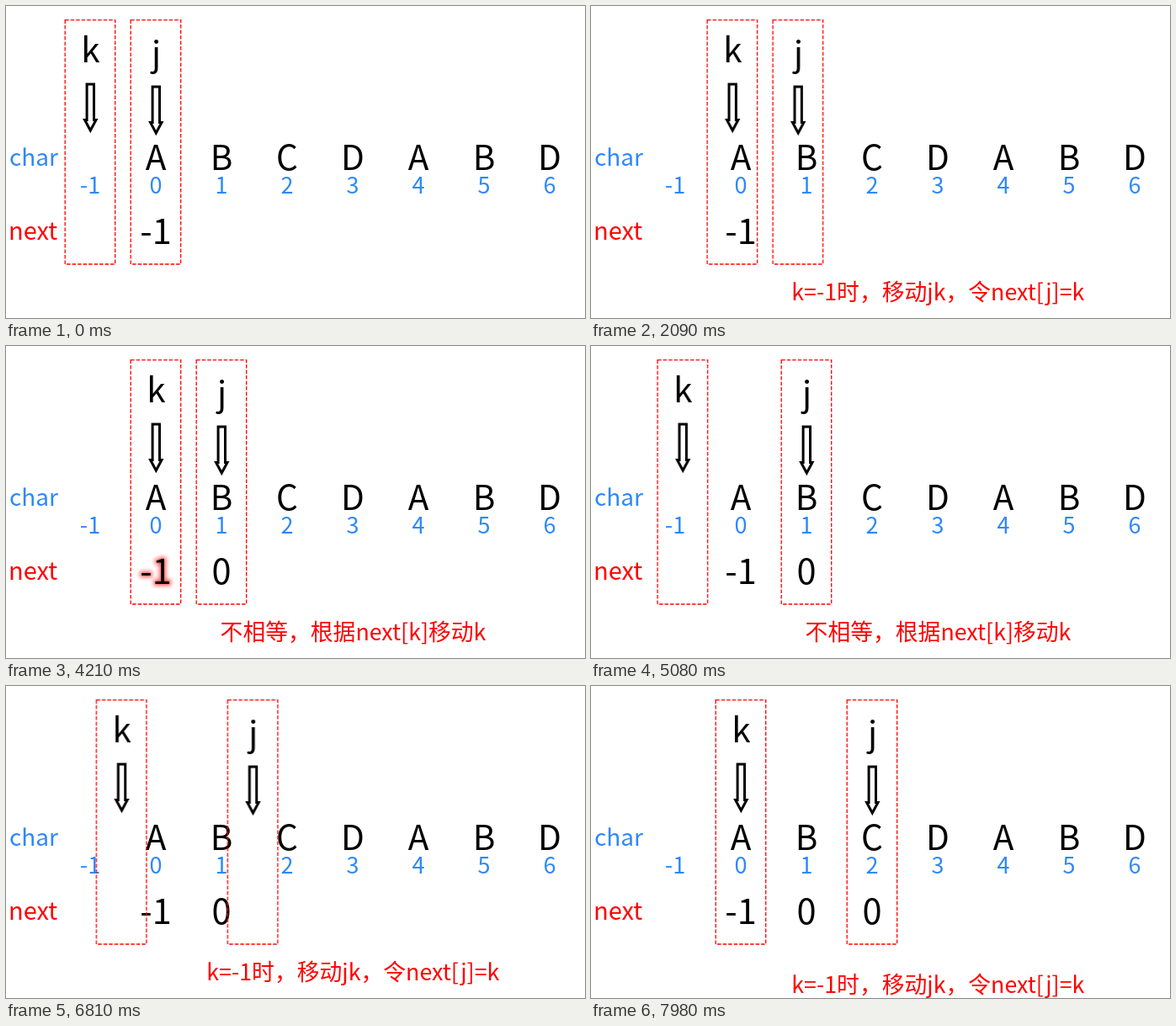
An HTML page that plays this animation: 688x371 px, repeating every 8 s.

```html
<!DOCTYPE html>
<html lang="zh-CN">
<head>
<meta charset="utf-8">
<title>next table</title>
<style>
  html, body { margin: 0; width: 100%; height: 100%; overflow: hidden; background: #fff; }
  svg { display: block; width: 688px; height: 371px; }
  text { font: 40.5px "Noto Sans CJK SC", "Noto Sans CJK", sans-serif; text-anchor: middle; }
  .label { font-size: 28px; text-anchor: start; }
  .index { font-size: 27px; }
  .value { font-size: 41.5px; }
  .blue { fill: #2e88f8; }
  .red { fill: #f00; }
  .next { font-size: 29px; }
  .caption { font-size: 26.8px; fill: #f00; }
  .frame { fill: none; stroke: #f00; stroke-width: 1.3; stroke-dasharray: 4.5 2; }
  .arrow { fill: #fff; stroke: #000; stroke-width: 3; stroke-miterlimit: 10; }
  .glow { fill: #f00; stroke: #f00; stroke-width: 4; filter: blur(2.5px); }

  .k, .j, .move, .compare, .first, .second, .glow { animation: 8s linear infinite both; }
  .k { animation-name: k; }
  .j { animation-name: j; }
  .move { animation-name: move; }
  .compare { animation-name: compare; }
  .first { animation-name: first; }
  .second { animation-name: second; }
  .glow { animation-name: glow; }

  /* pointers: one column is 78px */
  @keyframes k {
    0% { transform: translateX(0); }
    20.5% { transform: translateX(0); animation-timing-function: ease; }
    30.25% { transform: translateX(78px); }
    59.75% { transform: translateX(78px); animation-timing-function: ease; }
    66% { transform: translateX(0); }
    82.4% { transform: translateX(0); animation-timing-function: ease; }
    92.1%, 100% { transform: translateX(78px); }
  }
  @keyframes j {
    0% { transform: translateX(0); }
    20.5% { transform: translateX(0); animation-timing-function: ease; }
    30.25% { transform: translateX(78px); }
    82.4% { transform: translateX(78px); animation-timing-function: ease; }
    92.1%, 100% { transform: translateX(156px); }
  }

  /* captions rise from below the stage and drop out again */
  @keyframes move {
    0% { transform: translateY(46px); }
    12% { transform: translateY(46px); animation-timing-function: cubic-bezier(.215, .61, .355, 1); }
    17.3% { transform: translateY(0); }
    40.6% { transform: translateY(0); animation-timing-function: ease-in; }
    42.5% { transform: translateY(46px); }
    72.85% { transform: translateY(46px); animation-timing-function: cubic-bezier(.215, .61, .355, 1); }
    78.1% { transform: translateY(0); }
    99.25% { transform: translateY(0); }
    100% { transform: translateY(22px); }
  }
  @keyframes compare {
    0% { transform: translateY(46px); }
    42.5% { transform: translateY(46px); animation-timing-function: cubic-bezier(.215, .61, .355, 1); }
    47.75% { transform: translateY(0); }
    70.75% { transform: translateY(0); animation-timing-function: ease-in; }
    72.75%, 100% { transform: translateY(46px); }
  }

  @keyframes first { 0%, 31.75% { opacity: 0; } 38%, 100% { opacity: 1; } }
  @keyframes second { 0%, 92.9% { opacity: 0; } 99.1%, 100% { opacity: 1; } }
  @keyframes glow { 0%, 50% { opacity: 0; } 53.2% { opacity: .8; } 56.6%, 100% { opacity: 0; } }
</style>
</head>
<body>
<svg viewBox="0 0 688 371">
  <defs>
    <rect id="frame" class="frame" x="-29.8" y="16.6" width="59.5" height="290.4"/>
    <path id="arrow" class="arrow" d="M-3.9 93H4.5V135.5H7L.3 148L-6.4 135.5H-3.9Z"/>
  </defs>

  <text class="label blue" x="4" y="190">char</text>
  <text class="label red next" x="3" y="277.5">next</text>

  <text x="178 256 334 412 490 568 646" y="195">ABCDABD</text>
  <text class="index blue" x="100" y="222.5">-1</text>
  <text class="index blue" x="178 256 334 412 490 568 646" y="222.5">0123456</text>

  <text class="value glow" x="178" y="283.4">-1</text>
  <text class="value" x="178" y="283.4">-1</text>
  <text class="value first" x="256" y="283.4">0</text>
  <text class="value second" x="334" y="283.4">0</text>

  <g class="k">
    <g transform="translate(100 0)">
      <use href="#frame"/>
      <text x=".5" y="67.4">k</text>
      <use href="#arrow"/>
    </g>
  </g>
  <g class="j">
    <g transform="translate(178 0)">
      <use href="#frame"/>
      <text x=".5" y="71">j</text>
      <use href="#arrow" y="3"/>
    </g>
  </g>

  <text class="caption move" x="412.3" y="350">k=-1时，移动jk，令next[j]=k</text>
  <text class="caption compare" x="412.5" y="350">不相等，根据next[k]移动k</text>
</svg>
</body>
</html>
```
